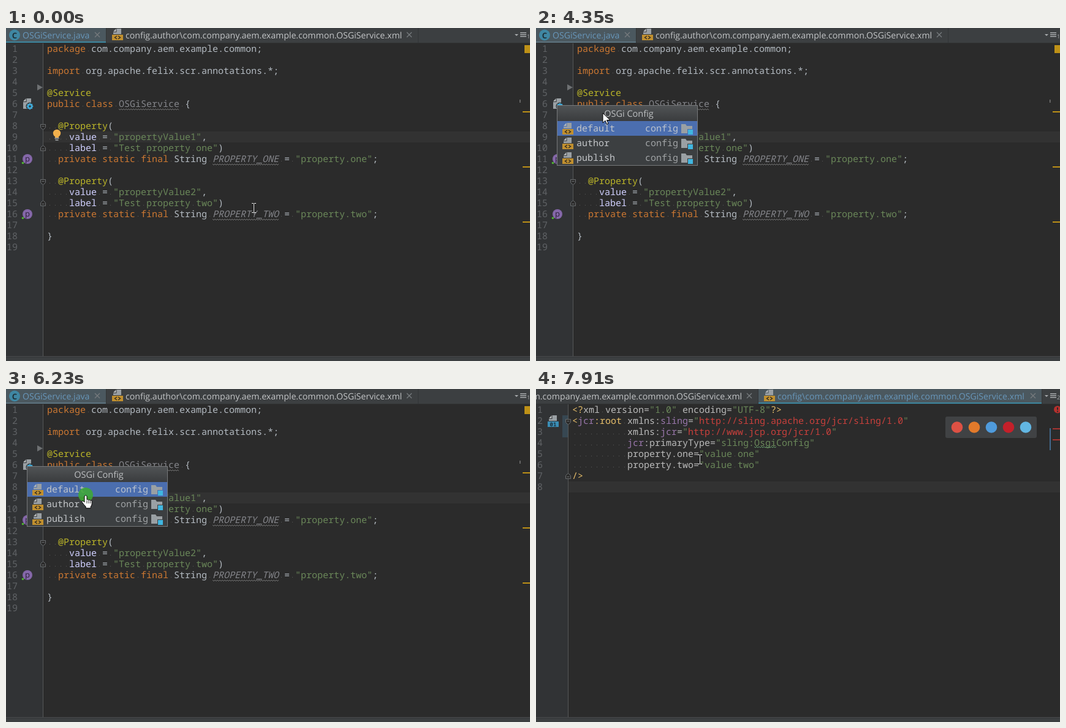
An HTML page with a canvas that plays this animation: 855x544 px, repeating every 8 s.

```html
<!DOCTYPE html>
<html lang="en">
<head>
<meta charset="utf-8">
<title>OSGi config navigation</title>
<style>
  html, body { margin: 0; width: 100%; height: 100%; overflow: hidden; background: #2b2b2b; }
  canvas { display: block; }
</style>
</head>
<body>
<canvas id="stage" width="855" height="544"></canvas>
<script>
const g = document.getElementById('stage').getContext('2d');
const LOOP = 8000, ROW = 18, CHAR = 9;
const MONO = '15px "Noto Sans Mono", "DejaVu Sans Mono", monospace';
const ui = size => `${size}px "Open Sans", "Noto Sans", sans-serif`;

// Colour codes used inside the code lines, written as ~code.
const INK = {
  t: '#b3bac1', o: '#cc7832', a: '#bbb529', s: '#6a8759', f: '#d0d0ff',
  u: '#84858a', y: '#e8bf6a', n: '#9876aa', r: '#c8403c', g: '#bababa'
};

const JAVA = [
  '~opackage~t com.company.aem.example.common;',
  '',
  '~oimport~t org.apache.felix.scr.annotations.*;',
  '',
  '~a@Service',
  '~opublic class ~uOSGiService~t {',
  '',
  ...property('One'),
  '',
  ...property('Two'),
  '',
  '~t}',
  ''
];

const XML = [
  '~y<?~gxml version=~s"1.0"~g encoding=~s"UTF-8"~y?>',
  '~y<~njcr~y:root ~gxmlns:~nsling~g=~s"~rhttp://sling.apache.org/jcr/sling/1.0~s"',
  '          ~gxmlns:~njcr~g=~s"~rhttp://www.jcp.org/jcr/1.0~s"',
  '          ~njcr~g:primaryType=~s"sling:OsgiConfig"',
  '          ~gproperty.one=~s"value one"',
  '          ~gproperty.two=~s"value two"',
  '~y/>',
  ''
];

function property(name) {
  const low = name.toLowerCase(), digit = low === 'one' ? 1 : 2;
  return [
    '  ~a@Property~t(',
    `    ~fvalue~t = ~s"propertyValue${digit}"~t,`,
    `    ~flabel~t = ~s"Test property ${low}"~t)`,
    `  ~oprivate static final ~tString ~iPROPERTY_${name.toUpperCase()}~t = ~s"property.${low}"~t;`
  ];
}

// Pointer hot spot: time, x, y.
const POINTER = [
  [0, 404, 294], [130, 404, 294], [990, 190, 178], [1890, 65, 137],
  [2490, 41, 132], [2600, 41, 132], [2950, 37, 127], [4080, 37, 127],
  [4350, 109, 139], [4430, 109, 139], [4950, 147, 204], [5300, 143, 210],
  [5770, 134, 185], [6070, 130, 173], [6270, 130, 173], [6470, 191, 177],
  [7010, 235, 160], [7910, 267, 115], [8000, 267, 115]
];

const ARROW = new Path2D('M0 0V16L4 12.3 6.6 18.3 9 17.2 6.5 11.5H12Z');
const HAND = new Path2D('M-2 2q2-3 4 0v6q1.5-1.5 3 .5q1.5-1.2 2.8.5q2-.8 2.4 1.2v4' +
  'q0 3-2 5v2.5h-8v-2.5q-4-4-6.5-8q0-2.5 2.5-1l1.8 1.6z');

function rect(x, y, w, h, color) {
  g.fillStyle = color;
  g.fillRect(x, y, w, h);
}

function shape(color, points) {
  g.beginPath();
  points.forEach(([x, y]) => g.lineTo(x, y));
  g.closePath();
  g.fillStyle = color;
  g.fill();
}

function disc(x, y, r, color) {
  g.beginPath();
  g.arc(x, y, r, 0, 7);
  g.fillStyle = color;
  g.fill();
}

function polyline(color, points, width = 1) {
  g.beginPath();
  points.forEach(([x, y]) => g.lineTo(x, y));
  g.strokeStyle = color;
  g.lineWidth = width;
  g.stroke();
}

function text(str, x, y, color, font = MONO, align = 'left') {
  g.font = font;
  g.textAlign = align;
  g.fillStyle = color;
  g.fillText(str, x, y);
}

function wave(x0, x1, y, color) {
  const points = [];
  for (let x = x0; x <= x1; x += 2) points.push([x, y + (x - x0) / 2 % 2 * 2]);
  polyline(color, points);
}

function codeLine(source, x, row) {
  const y = 39 + row * ROW;
  source.split(/(~[a-z])/).reduce((code, part) => {
    if (/^~[a-z]$/.test(part)) return part[1];
    const unused = code === 'i';
    text(part, x, y, INK[unused ? 'u' : code], unused ? 'italic ' + MONO : MONO);
    if (unused || code === 'u') wave(x, x + part.length * CHAR, y + 3, '#747474');
    [...part].forEach((c, i) => c === ' ' && rect(x + i * CHAR + 4, y - 2, 1, 1, '#5a5a5a'));
    x += part.length * CHAR;
    return code;
  }, 't');
}

function page(x, y, w, h) {
  shape('#9aa0a4', [[x + 5.5, y], [x + w, y], [x + w, y + h], [x, y + h], [x, y + 6], [x + 5.5, y + 6]]);
  shape('#b4b8ba', [[x, y + 5], [x + 4.5, y], [x + 4.5, y + 5]]);
}

function fileIcon(x, y, band = '#c1902f', label = '<>') {
  page(x + 2, y, 13, 9);
  rect(x, y + 10, 18, 9, band);
  if (label === '<>') {
    polyline('#2f2a20', [[x + 8, y + 12], [x + 4.5, y + 14.5], [x + 8, y + 17]], 1.4);
    polyline('#2f2a20', [[x + 10, y + 12], [x + 13.5, y + 14.5], [x + 10, y + 17]], 1.4);
  } else {
    text(label, x + 9, y + 18, '#1f3440', 'bold 9px "Noto Sans Mono", monospace', 'center');
  }
}

function closeMark(x) {
  polyline('#777b7e', [[x - 4, 7], [x + 4, 15]], 1.2);
  polyline('#777b7e', [[x + 4, 7], [x - 4, 15]], 1.2);
}

function tab(x, width, label, { changed, active, focused, isClass }) {
  if (active) rect(x, 0, width, 24, '#4b585f');
  if (isClass) {
    disc(x + 14, 11.5, 9, '#3f87a3');
    text('C', x + 14, 16.5, '#1f3138', 'bold ' + ui(13), 'center');
  } else {
    fileIcon(x + 9, 1);
  }
  text(label, x + (isClass ? 27 : 31), 17, changed ? '#6897bb' : '#c3c5c7', ui(14.13));
  closeMark(x + width - 14);
  rect(x + width, 0, 1, 24, '#323537');
  if (active) rect(x, 22, width, 2, focused ? '#3c87a0' : '#5d7480');
}

function tabBar(xmlOpen, scroll, focused) {
  const name = 'com.company.aem.example.common.OSGiService.xml';
  rect(0, 0, 855, 24, '#3c3f41');
  rect(0, 24, 855, 1, '#303233');
  tab(-scroll, 163, 'OSGiService.java', { changed: true, active: !xmlOpen, focused, isClass: true });
  tab(164 - scroll, 508, 'config.author\\' + name, {});
  if (xmlOpen) tab(673 - scroll, 462, 'config\\' + name, { changed: true, active: true, focused });
  if (xmlOpen && !scroll) return;
  rect(826, 0, 29, 24, '#3c3f41');
  shape('#a8abad', [[830, 10], [836, 10], [833, 13]]);
  [7, 10, 13].forEach(y => rect(839, y, 10, 1.5, '#a8abad'));
  text(xmlOpen ? '2' : '1', 850, 17, '#a8abad', ui(9));
}

function foldMark(x, y, up) {
  const d = up ? -1 : 1;
  const points = [[-4, -4], [4, -4], [4, 1], [0, 5], [-4, 1], [-4, -4]].map(([a, b]) => [x + a, y + b * d]);
  shape('#2b2b2b', points);
  polyline('#6a6d6f', points);
  polyline('#6a6d6f', [[x - 2, y - d], [x + 2, y - d]]);
}

function editor(lines, gutter, current, numberRight) {
  rect(0, 25, 855, 511, '#2b2b2b');
  rect(0, 25, gutter, 511, '#313335');
  rect(gutter, 25 + (current - 1) * ROW, 855 - gutter, ROW, '#323232');
  rect(gutter, 25, 1, 511, '#555758');
  lines.forEach((line, row) => {
    text(row + 1, numberRight, 39 + row * ROW, '#606366', MONO, 'right');
    codeLine(line, gutter + 7, row);
  });
}

function javaEditor() {
  editor(JAVA, 60, 9, 19);
  shape('#6e7173', [[51, 92], [60, 97], [51, 102]]);

  page(28, 115, 13, 17);
  disc(39, 128, 6.5, '#313335');
  for (let i = 0; i < 8; i++) {
    const a = i * Math.PI / 4;
    disc(39 + 4 * Math.cos(a), 128 + 4 * Math.sin(a), 1.4, '#40a9d6');
  }
  disc(39, 128, 4, '#40a9d6');
  disc(39, 128, 1.7, '#313335');

  for (const y of [160, 250]) {
    foldMark(60.5, y + 1.5);
    foldMark(60.5, y + 36.5, true);
    disc(35, y + 54, 8, '#8467a8');
    text('p', 35, y + 58, '#2b2138', ui(13), 'center');
    disc(27.5, y + 60.5, 1.8, '#4fb531');
  }

  disc(83, 172, 6.2, '#f2b04c');
  rect(80, 176, 6, 3, '#f2b04c');
  rect(79.5, 179, 7, 2, '#8e9193');
  rect(80.5, 182, 5, 2, '#8e9193');

  rect(846, 28, 9, 13, '#be9117');
  [136, 226, 316].forEach(y => rect(843, y, 12, 2, '#be9117'));
  rect(838, 117, 1.5, 5, '#777');
}

function xmlEditor(t) {
  editor(XML, 52, 8, 11);
  rect(43, 43, 9, 36, '#374752');
  wave(356, 392, 94, '#659c6b');
  fileIcon(19, 43, '#3a8db5', '01');
  foldMark(52.5, 53.5);
  foldMark(52.5, 142.5, true);
  if (t > 7110 && t < 7610) rect(59, 151, 2, 18, '#bbbbbb');

  disc(851, 33.5, 6, '#b5302d');
  rect(850, 30, 2, 4, '#2b2b2b');
  rect(850, 35.5, 2, 2, '#2b2b2b');
  [64, 82].forEach(y => rect(843, y, 12, 2, '#a63431'));
  rect(838, 64, 2, 36, '#43698d');

  g.globalAlpha = Math.max(0, Math.min(1, (t - 6800) / 400));
  g.beginPath();
  g.roundRect(668, 45, 149, 35, 3);
  g.fillStyle = '#404244';
  g.fill();
  ['#dd5144', '#e27a2b', '#4f9bdc', '#c4202a', '#62b6e2']
    .forEach((color, i) => disc(687 + 28 * i, 62.5, 9.3, color));
  g.globalAlpha = 1;
}

function popup(selected) {
  rect(34, 126, 230, 99, '#77797b');
  const title = g.createLinearGradient(0, 127, 0, 151);
  title.addColorStop(0, '#505355');
  title.addColorStop(1, '#3b3d3f');
  rect(35, 127, 228, 25, title);
  text('OSGi Config', 151.5, 145, '#bdbfc1', ui(14.5), 'center');
  ['default', 'author', 'publish'].forEach((name, i) => {
    const y = 152 + 24 * i, active = i === selected;
    rect(35, y, 228, 24, active ? '#4b6eaf' : '#3c3f41');
    fileIcon(43, y + 3);
    text(name, 66, y + 17, active || i ? '#c3c6c9' : '#6897bb');
    text('config', 178, y + 17, active ? '#bcc3ce' : '#a0a3a5');
    shape('#9aa0a4', [[237, y + 5], [244, y + 5], [246, y + 8], [255, y + 8], [255, y + 20], [237, y + 20]]);
    rect(247, y + 13, 9, 9, active ? '#4b6eaf' : '#3c3f41');
    rect(248, y + 14, 8, 8, '#40b6e0');
  });
  rect(34, 224, 230, 1, '#77797b');
}

function pointerAt(t) {
  const i = POINTER.findIndex(k => k[0] > t);
  const [t0, x0, y0] = POINTER[i - 1], [t1, x1, y1] = POINTER[i];
  const p = (t - t0) / (t1 - t0);
  return [x0 + (x1 - x0) * p, y0 + (y1 - y0) * p];
}

function pointer(kind, x, y) {
  g.save();
  g.translate(Math.round(x), Math.round(y));
  if (kind === 'beam') {
    rect(-1, -7, 3, 14, '#1c1c1c');
    rect(0, -7, 1, 14, '#f0f0f0');
    for (const end of [-8, 7]) {
      rect(-3, end, 3, 1, '#f0f0f0');
      rect(1, end, 3, 1, '#f0f0f0');
    }
  } else {
    const path = kind === 'hand' ? HAND : ARROW;
    g.fillStyle = '#fff';
    g.strokeStyle = '#000';
    g.lineWidth = 1;
    g.lineJoin = 'round';
    g.fill(path);
    g.stroke(path);
    if (kind === 'hand') [2, 5, 7.8].forEach(fx => rect(fx - .5, 9, 1, 5, '#333'));
  }
  g.restore();
}

function render(t) {
  const xmlOpen = t >= 6370;
  const popupOpen = t >= 3640 && !xmlOpen;
  const [x, y] = pointerAt(t);

  if (xmlOpen) xmlEditor(t); else javaEditor();
  tabBar(xmlOpen, t >= 6570 ? 310 : 0, !popupOpen);
  rect(0, 536, 855, 8, '#3c3f41');
  rect(0, 536, 855, 1, '#4b4d4f');
  rect(0, 537, 855, 1, '#323436');
  if (popupOpen) popup(y < 176 ? 0 : y < 200 ? 1 : 2);

  const pressed = t >= 3370 && t < 3550 || t >= 6230 && t < 6370;
  if (pressed) disc(x, y, 12, 'rgba(62, 170, 50, .85)');

  let kind = 'hand';
  if (xmlOpen || t < 3000 && x > 60) kind = 'beam';
  else if (t < 2490 || t >= 4080 && y < 152) kind = 'arrow';
  pointer(kind, x, y);
}

g.textRendering = 'geometricPrecision';
function frame(now) {
  render(now % LOOP);
  requestAnimationFrame(frame);
}
requestAnimationFrame(frame);
</script>
</body>
</html>
```
